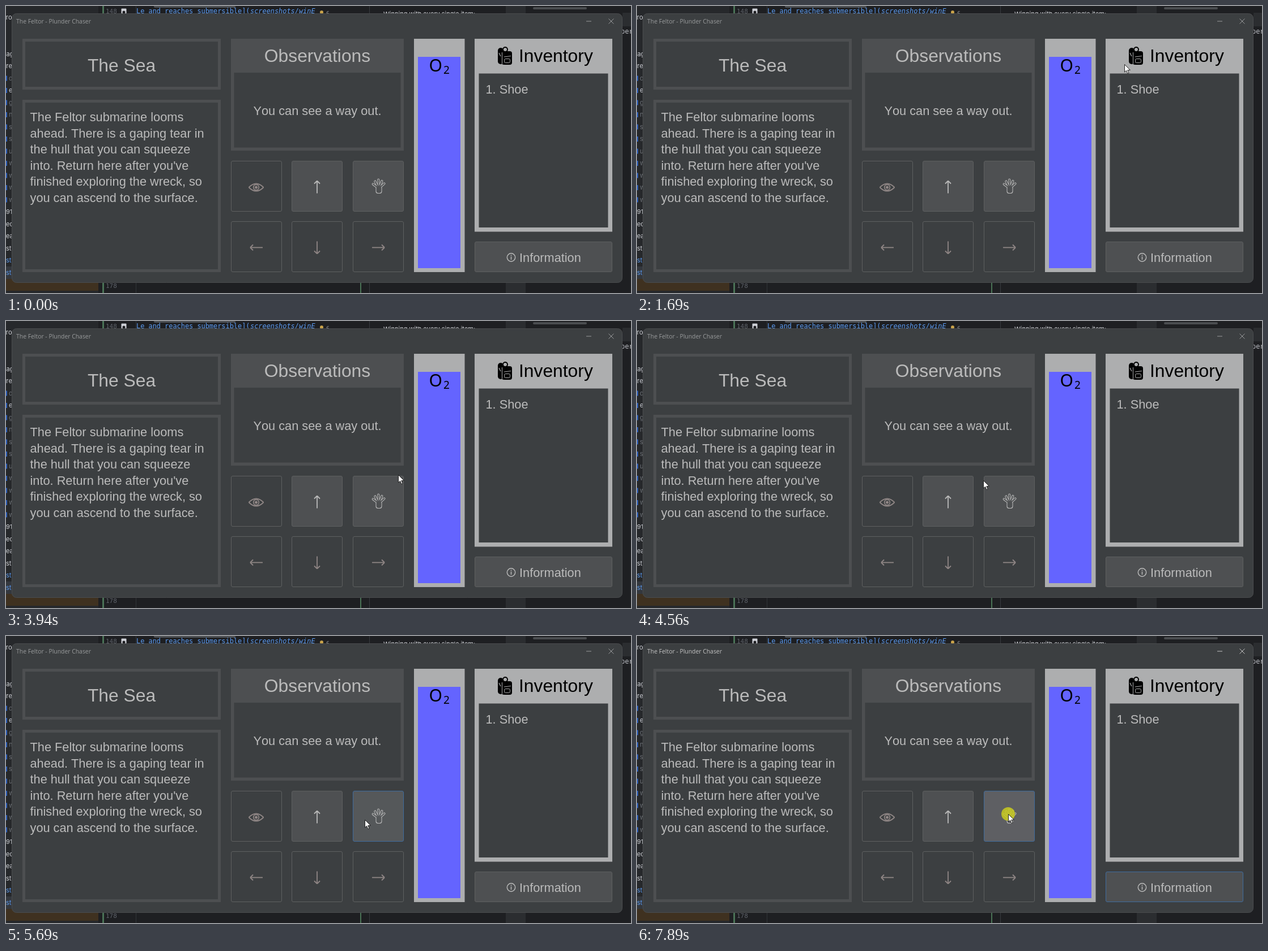
Write an HTML page with a canvas that moves like this. It is 1103 px wide and 508 px high and loops after 8 s.

```html
<!DOCTYPE html>
<html lang="en">
<head>
<meta charset="utf-8">
<title>Sea game</title>
<style>
  html, body { margin: 0; width: 100%; height: 100%; overflow: hidden; background: #1e1f22; }
  canvas { display: block; }
</style>
</head>
<body>
<canvas id="stage" width="1103" height="508"></canvas>
<script>
const ctx = document.getElementById('stage').getContext('2d');
const LOOP = 8000, CLICK = 7890, STEP = 67;
const BG = '#3c3f41', PANEL = '#4d4f51', LINE = '#5e6060', TEXT = '#bbbbbb';
const DIM = '#8f8685', SILVER = '#adaeaf', BLUE = '#3f6c9e';
const SANS = '"Liberation Sans", Arial, sans-serif';
const UI = '"Open Sans", "Noto Sans", sans-serif';
const SIDE = '11px Inter, sans-serif';
const MONO = '"DejaVu Sans Mono", monospace';
const BIG = '31.8px ' + SANS, BODY = '21.75px ' + SANS;

const ENABLED = ['up', 'take', 'info'];
const buttons = { info: { x: 827, y: 417, w: 243, h: 54 } };
['look', 'up', 'take', 'left', 'down', 'right'].forEach((name, i) => {
  buttons[name] = { x: Math.floor(397 + i % 3 * 107.6), y: i < 3 ? 274 : 381, w: 90, h: 90 };
});

// Pointer strokes: each arcs from the last stop, bend is the bulge relative to its length
const START = { x: 990, y: 510 };
const MOVES = [
  { from: 290, to: 750, x: 943, y: 270 },
  { from: 1020, to: 1690, x: 860, y: 103 },
  { from: 1750, to: 1810, x: 831, y: 113 },
  { from: 1880, to: 1880, x: 813, y: 118 },
  { from: 1950, to: 2160, x: 905, y: 130, bend: -0.25 },
  { from: 2230, to: 2500, x: 902, y: 231, bend: -0.15 },
  { from: 2830, to: 2830, x: 839, y: 246 },
  { from: 2900, to: 3040, x: 720, y: 286 },
  { from: 3210, to: 3210, x: 719, y: 286 },
  { from: 3800, to: 4560, x: 611, y: 282, bend: 0.16 },
  { from: 4620, to: 5010, x: 562, y: 328 },
  { from: 5290, to: 5690, x: 633, y: 325 },
  { from: 6410, to: 6690, x: 522, y: 228, bend: 0.2 },
  { from: 6755, to: 7030, x: 626, y: 212 },
  { from: 7160, to: 7210, x: 643, y: 257 },
  { from: 7300, to: 7480, x: 655, y: 315 }
];

function pointerAt(t) {
  let last = START, pos = null;
  for (const move of MOVES) {
    if (t < move.from) break;
    const gaps = Math.round((move.to - move.from) / STEP);
    const done = t >= move.to ? gaps : Math.floor((t - move.from) / (move.to - move.from) * gaps);
    const u = (done + 1) / (gaps + 1), bulge = 4 * u * (1 - u) * (move.bend || 0);
    const dx = move.x - last.x, dy = move.y - last.y;
    pos = {
      x: Math.round(last.x + dx * u - dy * bulge),
      y: Math.round(last.y + dy * u + dx * bulge)
    };
    last = move;
  }
  return pos;
}

function box(x, y, w, h, fill) {
  ctx.fillStyle = fill;
  ctx.fillRect(x, y, w, h);
}

function round(x, y, w, h, r, fill, stroke) {
  ctx.beginPath();
  ctx.roundRect(x, y, w, h, r);
  if (fill) { ctx.fillStyle = fill; ctx.fill(); }
  if (stroke) { ctx.strokeStyle = stroke; ctx.lineWidth = 1; ctx.stroke(); }
}

function text(s, x, y, font, color, align = 'left') {
  ctx.font = font;
  ctx.fillStyle = color;
  ctx.textAlign = align;
  ctx.fillText(s, x, y);
}

function line(x1, y1, x2, y2, color, width = 1) {
  ctx.beginPath();
  ctx.moveTo(x1, y1);
  ctx.lineTo(x2, y2);
  ctx.strokeStyle = color;
  ctx.lineWidth = width;
  ctx.stroke();
}

function disc(x, y, r, color) {
  ctx.beginPath();
  ctx.arc(x, y, r, 0, Math.PI * 2);
  ctx.fillStyle = color;
  ctx.fill();
}

function ring(x, y, r, color, width) {
  ctx.beginPath();
  ctx.arc(x, y, r, 0, Math.PI * 2);
  ctx.strokeStyle = color;
  ctx.lineWidth = width;
  ctx.stroke();
}

// Filled frame with an inner area; top is the height of its heading
function frame(x, y, w, h, edge, color = PANEL, top = edge) {
  box(x, y, w, h, color);
  box(x + edge, y + top, w - 2 * edge, h - top - edge, BG);
}

function drawDesktop() {
  box(0, 0, 1103, 508, '#1e1f22');
  box(0, 0, 163, 508, '#26282b');
  box(0, 461, 163, 22, '#34383e');
  box(0, 483, 163, 21, '#3f3120');
  box(170, 0, 3, 508, '#4a7256');
  box(625, 488, 2, 20, '#4a7256');
  box(229, 0, 1, 508, '#313438');
  box(641, 0, 1, 508, '#393b40');
  box(882, 0, 35, 508, '#2b2d30');
  box(1088, 12, 15, 24, '#2b2d30');
  round(261, -2, 144, 5, 2, '#4d5054');
  round(930, 2, 95, 4, 2, '#4b4d50');

  const code = '11.9px ' + MONO, link = '#5c9bf0', pale = '#ced0d6';
  text('148', 176, 13, '11px ' + MONO, '#5f636b');
  text('178', 176, 499, '11px ' + MONO, '#5f636b');
  round(203.5, 4.5, 9, 9, 1, pale);
  disc(208, 11, 2.5, '#1e1f22');
  text('Le and reaches submersible](', 230, 13, code, link);
  text('screenshots/winE', 431, 13, 'italic ' + code, link);
  box(431, 15, 115, 1, link);
  disc(557, 11, 3, '#c8a24a');
  text('6', 565, 17, '10px ' + UI, '#9da0a8');
  text('Winning with every single item:', 666, 18, SIDE, '#d5d7dc');
  text('per', 1085, 49, code, '#bcbec4');

  const row = i => 24 + i * 21.5;
  text('pro', -7, row(0), SIDE, pale);
  ['nag', 'cre'].forEach((s, i) => text(s, -6, row(i + 3), SIDE, pale));
  [...'degnssuwwww'].forEach((s, i) => {
    box(0, row(i + 5) - 8, 2, 9, '#2f60bd');
    text(s, 5, row(i + 5), SIDE, i === 1 ? pale : '#6d7176');
  });
  ['91', 'ed', 'ea', 'str', 'st', 'st'].forEach((s, i) =>
    text(s, 0, row(i + 16), SIDE, i > 3 ? link : pale));
}

function drawWindow(active) {
  round(10.5, 13.5, 1077, 476, 8, BG, '#4a4c4e');
  const tone = active ? '#c4c4c4' : '#999b9c';
  text('The Feltor - Plunder Chaser', 18, 31, '10.4px ' + UI, tone);
  line(1024, 27, 1033, 27, tone);
  line(1063.5, 22.5, 1072.5, 31.5, tone);
  line(1063.5, 31.5, 1072.5, 22.5, tone);
}

function drawPack() {
  round(868, 74, 10, 29, 5, '#000');
  round(875, 80, 18, 24, 4, '#000');
  ring(881, 77, 4, '#000', 2);
  line(875.5, 82, 875.5, 102, SILVER);
  line(879, 90, 891, 88.5, SILVER, 1.2);
  line(870, 83, 873, 89, SILVER, 1.2);
  round(879.5, 93.5, 10, 7, 2, null, SILVER);
}

function drawPanels() {
  frame(29, 58, 350, 90, 5);
  text('The Sea', 204, 115.5, BIG, TEXT, 'center');
  frame(29, 166, 350, 305, 5);
  ['The Feltor submarine looms', 'ahead. There is a gaping tear in', 'the hull that you can squeeze',
    "into. Return here after you've", 'finished exploring the wreck, so', 'you can ascend to the surface.'
  ].forEach((s, i) => text(s, 42.5, 204 + i * 28.6, BODY, TEXT));

  frame(397, 58, 305, 198, 5.5, PANEL, 60);
  text('Observations', 549.5, 98.5, BIG, TEXT, 'center');
  text('You can see a way out.', 549.5, 192.5, BODY, TEXT, 'center');

  box(720, 58, 89.5, 413, SILVER);
  box(727, 90, 75, 374, '#6464ff');
  text('O', 746.5, 115.5, '30px "Noto Sans", sans-serif', '#000');
  text('2', 772, 120, '19px "Noto Sans", sans-serif', '#000');

  frame(827, 58, 243, 341.5, 7.5, SILVER, 61.5);
  drawPack();
  text('Inventory', 905, 98.5, BIG, '#000');
  text('1. Shoe', 846.5, 154.5, BODY, TEXT);
}

function drawArrow({ x, y, w, h }, turns, color) {
  ctx.save();
  ctx.translate(x + w / 2, y + h / 2 + 1.5);
  ctx.rotate(turns * Math.PI / 2);
  line(-11, 0, 10.5, 0, color, 1.8);
  for (const side of [-5, 5]) line(6, side, 11, 0, color, 1.8);
  ctx.restore();
}

function drawEye(x, y) {
  ctx.beginPath();
  for (const lid of [-13, 13]) {
    ctx.moveTo(x - 13, y);
    ctx.quadraticCurveTo(x, y + lid, x + 13, y);
  }
  ctx.strokeStyle = DIM;
  ctx.lineWidth = 1.8;
  ctx.stroke();
  ring(x, y, 4.8, DIM, 1.8);
  disc(x, y, 2.5, DIM);
}

// Spread fingers fan out from the palm; a wider pass below leaves the outline
function drawHand(x, y, fill) {
  ctx.lineCap = 'round';
  for (const [color, grow] of [[TEXT, 1], [fill, 0]]) {
    for (let i = 0; i < 5; i++) {
      const angle = -2.5 + i * 0.44, reach = 15.5 - Math.abs(i - 2) * 1.3;
      const c = Math.cos(angle), s = Math.sin(angle);
      line(x + c * 4, y + s * 4, x + c * reach, y + s * reach, color, 2 + 2 * grow);
    }
    round(x - 4.5 - grow, y - 4 - grow, 9 + 2 * grow, 12 + 2 * grow, 4, color);
  }
  ctx.lineCap = 'butt';
}

function drawButtons(pointer, clicked) {
  const fills = {};
  for (const [name, { x, y, w, h }] of Object.entries(buttons)) {
    const enabled = ENABLED.includes(name);
    const over = enabled && pointer && pointer.x >= x && pointer.x < x + w &&
      pointer.y >= y && pointer.y < y + h;
    const focused = clicked && name === 'info';
    fills[name] = !enabled ? BG : over ? (clicked ? '#5e5f63' : '#55585a') : '#4e5052';
    round(x + 0.5, y + 0.5, w - 1, h - 1, 2.5, fills[name], over || focused ? BLUE : LINE);
  }
  drawEye(441.5, 321);
  drawHand(658, 323, fills.take);
  ['right', 'down', 'left', 'up'].forEach((name, turns) =>
    drawArrow(buttons[name], turns, name === 'up' ? TEXT : DIM));
  ring(891.5, 445, 7.2, TEXT, 1.4);
  line(891.5, 443.5, 891.5, 449, TEXT, 1.5);
  line(891.5, 440.5, 891.5, 442.2, TEXT, 1.5);
  text('Information', 906, 453, BODY, TEXT);
}

function drawPointer({ x, y }, clicked) {
  if (clicked) disc(x, y, 12, 'rgba(200, 202, 30, 0.85)');
  ctx.save();
  ctx.translate(x, y);
  const arrow = new Path2D('M.5 .5V14L3.6 11.2L5.8 16.5L8 15.6L5.8 10.5L10.3 10.3Z');
  ctx.fillStyle = '#fff';
  ctx.fill(arrow);
  ctx.strokeStyle = '#111';
  ctx.lineWidth = 0.9;
  ctx.stroke(arrow);
  ctx.restore();
}

function draw(now) {
  const t = now % LOOP, clicked = t >= CLICK, pointer = pointerAt(t);
  ctx.fontKerning = 'none';
  drawDesktop();
  drawWindow(clicked);
  drawPanels();
  drawButtons(pointer, clicked);
  if (pointer) drawPointer(pointer, clicked);
}

const began = performance.now();
function tick() {
  draw(performance.now() - began);
  requestAnimationFrame(tick);
}
tick();
</script>
</body>
</html>
```
